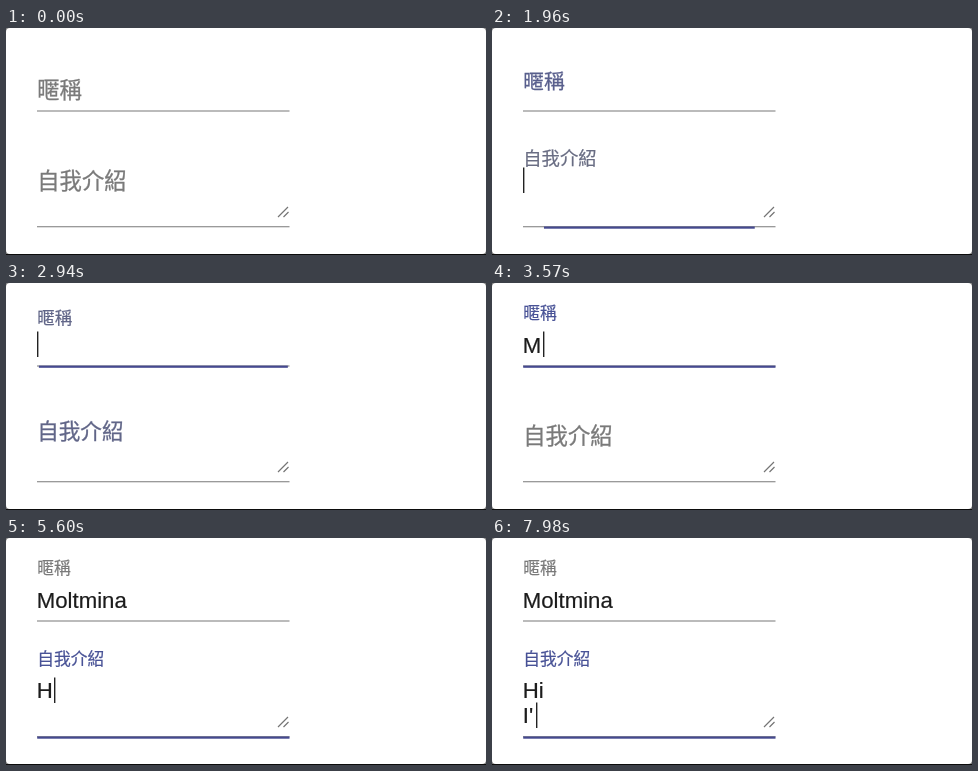
An HTML page that plays this animation: 480x227 px, repeating every 8000 ms.

```html
<!DOCTYPE html>
<html lang="zh-Hant">
<head>
<meta charset="utf-8">
<title>Floating labels</title>
<style>
  html, body { margin: 0; width: 100%; height: 100%; overflow: hidden; background: #fff; }
  svg { display: block; width: 480px; height: 227px; }
  .label { font: 22.35px "Noto Sans CJK TC", "Noto Sans CJK", sans-serif; stroke-width: .3; }
  .value { font: 22.2px "Liberation Sans", Arial, sans-serif; fill: #1c1c1c; stroke: #1c1c1c; stroke-width: .2; white-space: pre; }
  .rule { fill: #8f8f8f; }
  .ripple { fill: #45498f; }
  .grip { stroke: #757575; stroke-width: 1.2; fill: none; }
</style>
</head>
<body>
<svg viewBox="0 0 480 227">
  <rect width="480" height="227" fill="#7a7a7a"/>
  <rect y="226" width="480" height="1" fill="#0c0c0c"/>
  <rect width="480" height="226" rx="4" fill="#fff"/>

  <rect class="rule" x="31" y="82.4" width="252.5" height="1.2"/>
  <rect class="rule" x="31" y="198.1" width="252.5" height="1.2"/>
  <rect class="ripple" id="nickRipple" y="82.6" height="2.2"/>
  <rect class="ripple" id="bioRipple" y="198.5" height="2.2"/>
  <path class="grip" d="M272 189L282 179M277.5 189L282.5 184"/>

  <text class="label" id="nickLabel">暱稱</text>
  <text class="label" id="bioLabel">自我介紹</text>
  <text class="value" id="nick" x="30.8" y="70"></text>
  <text class="value" id="bio1" x="30.8" y="160"></text>
  <text class="value" id="bio2" x="30.8" y="185"></text>
  <rect id="caret" width="1.4" height="25.5" fill="#222"/>
</svg>
<script>
const LOOP = 8000, LEFT = 31.2, WIDTH = 252.3;
const GREY = [122, 122, 122], INDIGO = [72, 82, 150];
const $ = id => document.getElementById(id);

// Times at which each state flips, starting from "off"
const fields = [
  { id: 'nick', rest: 70.4, lift: 32, float: [998, 1860, 2790], focus: [998, 1860, 2790, 4660], ripple: [1019, 1860, 2750, 4660] },
  { id: 'bio', rest: 160.6, lift: 31.2, float: [1860, 2790, 4660], focus: [1860, 2790, 4660], ripple: [1892, 2790, 4685] }
];

// Typing: time, row, text
const typed = [
  ...[3570, 3710, 3780, 3990, 4130, 4200, 4340, 4480].map((t, i) => [t, 'nick', 'Moltmina'.slice(0, i + 1)]),
  [5600, 'bio1', 'H'], [6160, 'bio1', 'Hi'],
  [7700, 'bio2', 'I'], [7910, 'bio2', "I'"]
];

// Caret: time, row, x (no row = hidden)
const carets = [
  [0], [1050, 'nick', 31], [1540], [1890, 'bio1', 31], [2450], [2800, 'nick', 31], [3290],
  [3570, 'nick', 51], [3710, 'nick', 63], [3780, 'nick', 68], [3990, 'nick', 73.5],
  [4130, 'nick', 91], [4200, 'nick', 95.5], [4340, 'nick', 108], [4480, 'nick', 121],
  [4690, 'bio1', 31], [5180], [5600, 'bio1', 48], [6090], [6160, 'bio1', 52.5], [6720],
  [7210, 'bio2', 31], [7700, 'bio2', 37], [7910, 'bio2', 44]
];
const caretTop = { nick: 48.5, bio1: 139.5, bio2: 164.5 };

const linear = x => Math.min(Math.max(x, 0), 1);

// cubic-bezier(.25, .8, .25, 1)
function ease(x) {
  if (x <= 0) return 0;
  if (x >= 1) return 1;
  const curve = (a, b, s) => 3 * (1 - s) ** 2 * s * a + 3 * (1 - s) * s * s * b + s ** 3;
  let lo = 0, hi = 1;
  for (let i = 0; i < 24; i++) {
    const mid = (lo + hi) / 2;
    if (curve(.25, .25, mid) < x) lo = mid; else hi = mid;
  }
  return curve(.8, 1, lo);
}

const flips = (times, t) => times.filter(s => s <= t).length;
function level(times, t, span, easing = ease) {
  const n = flips(times, t);
  if (!n) return 0;
  const p = easing((t - times[n - 1]) / span);
  return n % 2 ? p : 1 - p;
}

function drawField(f, t) {
  const up = level(f.float, t, 400), lit = level(f.focus, t, 300, linear);
  const scale = 1 - .25 * up;
  // Ideographs are centred .38em above the baseline
  const y = f.rest - f.lift * up - 22.35 * .38 * .25 * up;
  const color = `rgb(${GREY.map((c, i) => Math.round(c + (INDIGO[i] - c) * lit))})`;
  const label = $(f.id + 'Label');
  label.setAttribute('transform', `translate(${LEFT} ${y}) scale(${scale})`);
  label.setAttribute('fill', color);
  label.setAttribute('stroke', color);

  const on = flips(f.ripple, t) % 2;
  const w = on ? WIDTH * (.5 + .5 * level(f.ripple, t, 300)) : 0;
  const ripple = $(f.id + 'Ripple');
  ripple.setAttribute('x', LEFT + (WIDTH - w) / 2);
  ripple.setAttribute('width', w);
}

function render(t) {
  fields.forEach(f => drawField(f, t));

  const rows = { nick: '', bio1: '', bio2: '' };
  for (const [at, row, text] of typed) if (at <= t) rows[row] = text;
  for (const row in rows) if ($(row).textContent !== rows[row]) $(row).textContent = rows[row];

  const [, row, x] = carets.filter(c => c[0] <= t).pop();
  const caret = $('caret');
  caret.setAttribute('visibility', row ? 'visible' : 'hidden');
  if (row) {
    caret.setAttribute('x', x);
    caret.setAttribute('y', caretTop[row]);
  }
}

const start = performance.now();
function tick() {
  render((performance.now() - start) % LOOP);
  requestAnimationFrame(tick);
}
tick();
</script>
</body>
</html>
```
